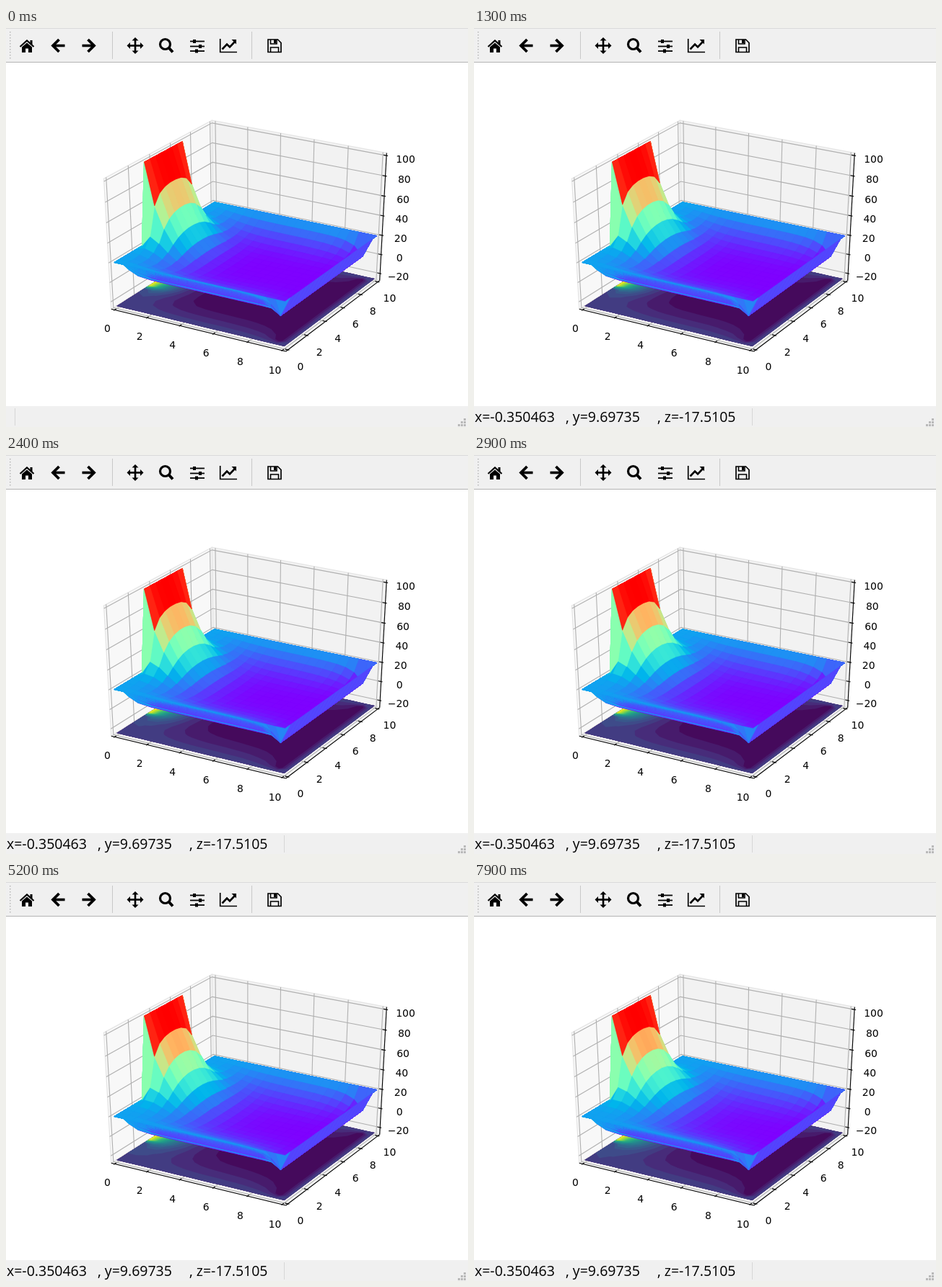
These frames come from a looping animation (640 by 554 pixels, 8 s). An HTML page with a canvas:

```html
<!DOCTYPE html>
<html lang="en">
<head>
<meta charset="utf-8">
<title>Heat diffusion surface</title>
<style>
html, body { margin: 0; width: 100%; height: 100%; overflow: hidden; background: #fff; }
canvas { display: block; width: 640px; height: 554px; }
</style>
</head>
<body>
<canvas id="stage" width="640" height="554"></canvas>
<script>
const ctx = document.getElementById('stage').getContext('2d');
const LOOP = 8000;
const CHANGES = [500, 900, 1800, 2400, 2900, 4000, 5200, 6500, 7900];
const N = 20, Z_MIN = -25, Z_MAX = 100;
const FIRST = 12; // surfaces already plotted when the loop starts
const PAD = 1 / 48, LO = -PAD, HI = 1 + PAD;
const clamp = v => Math.max(0, Math.min(1, v));
const unitZ = z => (z - Z_MIN) / (Z_MAX - Z_MIN);

// Perspective view of the unit cube: elevation 30, azimuth -60, distance 10.
function project(x, y, z) {
  const a = x - 0.5, b = y - 0.5, c = z - 0.5;
  const near = 0.433 * a - 0.75 * b + 0.5 * c;
  const right = 0.866 * a + 0.5 * b;
  const up = -0.25 * a + 0.433 * b + 0.866 * c;
  return [334.7 + 2681 * right / (10 - near), 282.9 - 1985 * up / (10 - near), near];
}

function initialField() {
  return Array.from({ length: N }, (_, i) => Array.from({ length: N }, (_, j) => {
    if (i === 0 && j >= 6 && j <= 13) return 100;
    return i === 0 || j === 0 || i === N - 1 || j === N - 1 ? 20 : 0;
  }));
}

// Explicit heat step; the column before the right edge stays cold.
function diffuse(t) {
  const next = t.map(row => row.slice());
  for (let i = 1; i < N - 2; i++)
    for (let j = 1; j < N - 1; j++)
      next[i][j] += 0.195 * (t[i - 1][j] + t[i + 1][j] + t[i][j - 1] + t[i][j + 1] - 4 * t[i][j]);
  return next;
}

const fields = [];
for (let t = initialField(); fields.length < FIRST + CHANGES.length; fields.push(t))
  t = diffuse(diffuse(t));

function rgb(parts) {
  return `rgb(${parts.map(v => Math.round(v)).join(',')})`;
}
function rainbow(v) {
  return rgb([Math.abs(2 * v - 0.5), Math.sin(Math.PI * v), Math.cos(Math.PI * v / 2)].map(c => 255 * clamp(c)));
}
const VIRIDIS = [0x440154, 0x482878, 0x3e4a89, 0x31688e, 0x26828e, 0x1f9e89, 0x35b779, 0x6ece58, 0xb5de2b, 0xfde725];
function viridis(v) {
  const p = clamp(v) * 9, k = Math.min(8, Math.floor(p)), f = p - k;
  return rgb([16, 8, 0].map(s => (VIRIDIS[k] >> s & 255) * (1 - f) + (VIRIDIS[k + 1] >> s & 255) * f));
}

function trace(points, close) {
  points.forEach((p, i) => i ? ctx.lineTo(p[0], p[1]) : ctx.moveTo(p[0], p[1]));
  if (close) ctx.closePath();
}
function fillPoly(points, color) {
  ctx.beginPath();
  trace(points, true);
  ctx.fillStyle = color;
  ctx.fill();
}
function line(points, color = '#000', width = 1.1) {
  ctx.beginPath();
  trace(points);
  ctx.strokeStyle = color;
  ctx.lineWidth = width;
  ctx.stroke();
}
const line3 = (points, color, width) => line(points.map(p => project(...p)), color, width);
const rect = (x, y, w, h, color = '#000') => { ctx.fillStyle = color; ctx.fillRect(x, y, w, h); };

function eachCell(t, visit) {
  for (let i = 0; i < N - 1; i++)
    for (let j = 0; j < N - 1; j++)
      visit([[i, j], [i + 1, j], [i + 1, j + 1], [i, j + 1]].map(([a, b]) => [a / (N - 1), b / (N - 1), t[a][b]]));
}

function clipAbove(cell, level) {
  const out = [];
  cell.forEach((p, k) => {
    const q = cell[(k + 1) % cell.length];
    if (p[2] > level) out.push(p);
    if (p[2] > level !== q[2] > level) {
      const f = (level - p[2]) / (q[2] - p[2]);
      out.push(p.map((v, d) => v + f * (q[d] - v)));
    }
  });
  return out;
}

function drawFloor(t) {
  for (let level = 0; level < 100; level += 5) {
    ctx.beginPath();
    eachCell(t, cell => {
      const part = level ? clipAbove(cell, level) : cell;
      trace(part.map(p => project(p[0], p[1], 0)), true);
    });
    ctx.fillStyle = viridis((level + 2.5) / 100);
    ctx.fill();
  }
}

// The closing corner of each face counts twice in its mean.
const faceMean = (corners, k) => [...corners, corners[0]].reduce((sum, p) => sum + p[k], 0) / 5;

function drawSurface(t) {
  const faces = [];
  eachCell(t, cell => {
    const points = cell.map(p => project(p[0], p[1], unitZ(p[2])));
    faces.push({ points, value: faceMean(cell, 2), near: faceMean(points, 2) });
  });
  const values = faces.map(f => f.value);
  const low = Math.min(...values), high = Math.max(...values);
  faces.sort((a, b) => a.near - b.near);
  for (const face of faces) {
    const color = rainbow((face.value - low) / (high - low));
    fillPoly(face.points, color);
    ctx.strokeStyle = color;
    ctx.lineWidth = 0.6;
    ctx.stroke();
  }
}

function drawPanes() {
  const panes = [
    ['#f8f8f8', [[LO, LO, LO], [LO, HI, LO], [LO, HI, HI], [LO, LO, HI]]],
    ['#f2f2f2', [[LO, HI, LO], [HI, HI, LO], [HI, HI, HI], [LO, HI, HI]]],
    ['#f5f5f5', [[LO, LO, LO], [HI, LO, LO], [HI, HI, LO], [LO, HI, LO]]]
  ];
  for (const [color, corners] of panes) {
    fillPoly(corners.map(c => project(...c)), color);
    line3([...corners, corners[0]], '#e4e4e4', 1.2);
  }
  const grid = '#b0b0b0';
  for (let k = 0; k <= 5; k++) {
    const v = k / 5;
    line3([[v, LO, LO], [v, HI, LO], [v, HI, HI]], grid);
    line3([[HI, v, LO], [LO, v, LO], [LO, v, HI]], grid);
  }
  for (let z = -20; z <= 100; z += 20) {
    const v = unitZ(z);
    line3([[LO, LO, v], [LO, HI, v], [HI, HI, v]], grid);
  }
}

function label(value, ...at) {
  const [x, y] = project(...at);
  ctx.fillStyle = '#000';
  ctx.fillText(String(value).replace('-', '\u2212'), x, y + 12);
}

function drawAxes() {
  line3([[LO, LO, LO], [HI, LO, LO]]);
  line3([[HI, LO, LO], [HI, HI, LO]]);
  line3([[HI, HI, LO], [HI, HI, HI]]);
  const out = 0.1 / 12, inner = 0.2 / 12, gap = 0.073;
  ctx.font = '13.9px "DejaVu Sans", sans-serif';
  ctx.textAlign = 'center';
  for (let k = 0; k <= 5; k++) {
    const v = k / 5;
    line3([[v, LO - out, LO], [v, LO + inner, LO]]);
    line3([[HI + out, v, LO], [HI - inner, v, LO]]);
    label(2 * k, v, LO - gap, LO - gap);
    label(2 * k, HI + gap, v, LO - gap);
  }
  for (let z = -20; z <= 100; z += 20) {
    const v = unitZ(z);
    line3([[HI + out, HI, v], [HI - inner, HI, v]]);
    label(z, HI + gap, HI + gap, v);
  }
}

function drawArrow(x, dir) {
  line([[x - 9.5 * dir, 24.5], [x + 7 * dir, 24.5]], '#000', 3.6);
  line([[x - 1.5 * dir, 16], [x + 7 * dir, 24.5], [x - 1.5 * dir, 33]], '#000', 3.8);
}

function drawToolbar() {
  rect(0, 0, 640, 47, '#f0f0f0');
  rect(0, 0, 640, 1, '#dadada');
  rect(0, 47, 640, 1, '#b4b4b4');
  for (let y = 5; y < 43; y += 4) rect(5, y, 1.5, 1.5, '#b8b8b8');
  rect(147, 5, 1, 38, '#c8c8c8');
  rect(340, 5, 1, 38, '#c8c8c8');

  line([[19.5, 26], [29, 17.5], [38.5, 26]], '#000', 2.2);
  rect(33.5, 17, 3, 6);
  fillPoly([[22, 26.5], [29, 20.5], [36, 26.5], [36, 34], [31, 34], [31, 28.5], [27, 28.5], [27, 34], [22, 34]], '#000');

  drawArrow(72, -1);
  drawArrow(115, 1);

  line([[171, 24.5], [187, 24.5]], '#000', 2.6);
  line([[179, 16.5], [179, 32.5]], '#000', 2.6);
  for (const [dx, dy] of [[1, 0], [-1, 0], [0, 1], [0, -1]]) {
    const x = 179 + 7 * dx, y = 24.5 + 7 * dy;
    fillPoly([[x + 4.5 * dx, y + 4.5 * dy], [x + 4.5 * dy, y + 4.5 * dx], [x - 4.5 * dy, y - 4.5 * dx]], '#000');
  }

  ctx.beginPath();
  ctx.arc(220.5, 22.5, 7, 0, 7);
  ctx.lineWidth = 3.2;
  ctx.strokeStyle = '#000';
  ctx.stroke();
  line([[225.5, 27.5], [231, 33.5]], '#000', 4);

  for (const [y, knob] of [[18.5, 261], [25.5, 269], [32, 264]]) {
    line([[255, y], [275, y]], '#000', 1.8);
    rect(knob - 2, y - 2.5, 4, 5);
  }

  line([[296.7, 15], [296.7, 33.5], [320, 33.5]], '#000', 1.7);
  line([[299.5, 29.5], [306, 22.5], [310, 26.5], [317, 19]], '#000', 2.6);
  fillPoly([[312.5, 16], [319, 16], [319, 22.5]], '#000');

  line([[363, 16], [376.5, 16], [381, 20.5], [381, 33.5], [363, 33.5], [363, 15.2]], '#000', 1.7);
  line([[366.5, 33], [366.5, 27], [377.5, 27], [377.5, 33]], '#000', 1.6);
  line([[366.5, 16], [366.5, 22], [375, 22], [375, 16]], '#000', 1.6);
  rect(371, 16, 3, 5);
}

function drawStatus(hasText) {
  rect(0, 525, 640, 29, '#f0f0f0');
  rect(hasText ? 385 : 12, 528, 1, 24, '#d6d6d6');
  for (let row = 0; row < 3; row++)
    for (let col = 0; col <= row; col++)
      rect(634 - 4 * col, 542 + 4 * row, 3, 3, '#b9b9b9');
  if (!hasText) return;
  ctx.fillStyle = '#000';
  ctx.font = '19.5px "Open Sans", "Noto Sans", sans-serif';
  ctx.textAlign = 'left';
  ctx.fillText('x=-0.350463', 1, 547);
  ctx.fillText(', y=9.69735', 127, 547);
  ctx.fillText(', z=-17.5105', 254, 547);
}

// Each new surface is plotted over all the earlier ones.
function draw(state) {
  const plotted = fields.slice(0, FIRST + state);
  rect(0, 0, 640, 554, '#fff');
  drawPanes();
  drawAxes();
  drawFloor(plotted[plotted.length - 1]);
  plotted.forEach(drawSurface);
  drawToolbar();
  drawStatus(state > 0);
}

let shown = -1;
const start = performance.now();
function tick() {
  const time = (performance.now() - start) % LOOP;
  const state = CHANGES.filter(t => t <= time).length;
  if (state !== shown) draw(shown = state);
  requestAnimationFrame(tick);
}
tick();
</script>
</body>
</html>
```
